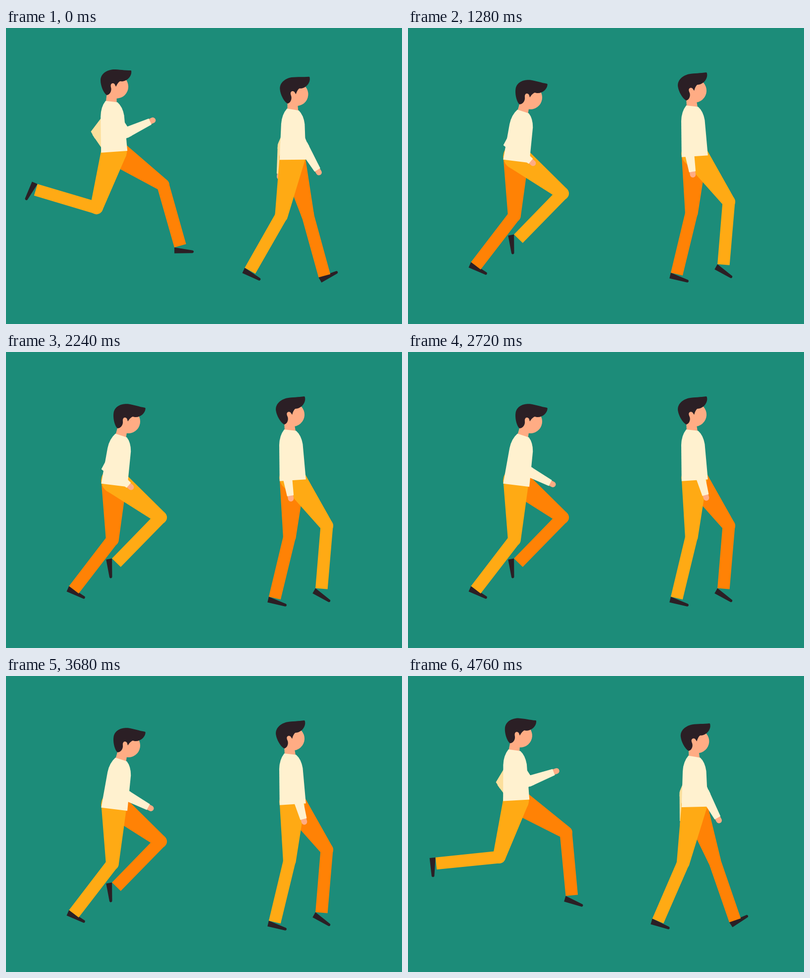
An HTML page with a canvas for the animation above (4.8 s loop, 800 by 600 pixels).

```html
<!DOCTYPE html>
<html lang="en">
<head>
<meta charset="utf-8">
<title>Run and walk</title>
<style>
html, body { margin: 0; width: 100%; height: 100%; overflow: hidden; background: #1c8c79; }
canvas { display: block; }
</style>
</head>
<body>
<canvas id="stage" width="800" height="600"></canvas>
<script>
const ctx = document.getElementById('stage').getContext('2d');
const STRIDE = 960, FRAME = 40;
const COLOR = {
  back: '#1c8c79', near: '#ffaa14', far: '#ff8205', shirt: '#fff1cf',
  sleeve: '#fcdf9c', skin: '#ffac84', dark: '#2b1f25'
};
const THIGH = 120, SHIN = 128, UPPER_ARM = 50;

const hair = new Path2D(`M-10.5-13C-18-19-22.5-34-22.5-42C-23-57-9-64 3-65
  C16-65 26-63 38.5-62.8Q40-62.5 39.7-60C40-52 33-43 23-41C20-40.5 18-41 16.5-41
  Q12-38 8.5-30L6-35C3-38.5-2-37-2-32C-2-29-1-28-1-25C-1-19-5-13-10.5-13Z`);
const neck = new Path2D('M-10-15L-12 3L10 5L10-9Z');
const torso = new Path2D('M-26.6 0L-22.5-73Q-21-92-10.3-104L13.5-99.5Q23-90 25-72L26.6 0Z');
const shoe = new Path2D('M0 0L0 12L36.5 11.8A2.8 2.8 0 0 0 37 6.3Z');

// A smooth cycle: the mean, then the cosine and sine weight of each harmonic.
const wave = (mean, ...weights) => phase => weights.reduce((sum, w, i) => {
  const angle = phase * (1 + (i >> 1));
  return sum + w * (i % 2 ? Math.sin(angle) : Math.cos(angle));
}, mean);

// The body moves once per step; limbs move once per stride of two steps.
const runner = {
  x: 218.7, hipX: 218.3, shoulder: -80, forearm: 55,
  hip: wave(254.7, -4.7, -3.5, 0, 0.5),
  hem: wave(258.7, -7.9, -5.5, 0, 3),
  lean: wave(3.3, -7.3),
  tilt: wave(1.6, -1.6, -7.6),
  thigh: wave(22.1, -37.1, 8.3, -3, -1.5, 0.8, -0.9),
  shin: wave(-47.6, -56.9, -34.9, 5, -9.6, -2.5, -4.8, -2.8, -0.5, -1.8),
  foot: wave(10.8, -4.5, 26),
  nearArm: [wave(-7.5, 33.5, -3.2, 7, -2.9), wave(57.5, 42.5, 17.6, 15, -7)],
  farArm: [wave(-6, -31, -20), wave(34, -32, -18.5, 28)]
};

const swing = [wave(0, 23), wave(12.3, 18.5, 6.9)];
const walker = {
  x: 579.3, hipX: 578.5, shoulder: -76, forearm: 59,
  hip: wave(258.3, 4.5, 1.8),
  hem: wave(263.8, 3.2, 2.5),
  lean: wave(-2.2, 1.5, 1),
  tilt: wave(-6.1, 0.5, 3.3),
  thigh: wave(10.8, -14.1, 12.4, -7.5, -1.4, 1.3, -0.8, -1.2),
  shin: wave(-15.4, -25.3, -12.8, 8.3, -12, 2.8, 2.9),
  foot: wave(3, -1, 7.3, -8.8, 1, 5.5, -3.5, -3.8, 4),
  nearArm: swing,
  farArm: swing.map(joint => phase => joint(phase + Math.PI))
};

const rad = deg => deg * Math.PI / 180;
// Angles run from straight down, positive towards the right.
const reach = (p, deg, len) => ({
  x: p.x + Math.sin(rad(deg)) * len,
  y: p.y + Math.cos(rad(deg)) * len
});

function disc(p, r) {
  ctx.beginPath();
  ctx.arc(p.x, p.y, r, 0, Math.PI * 2);
  ctx.fill();
}

function taper(a, b, deg, ra, rb) {
  const corners = [reach(a, deg + 90, ra), reach(b, deg + 90, rb),
                   reach(b, deg - 90, rb), reach(a, deg - 90, ra)];
  ctx.beginPath();
  corners.forEach(p => ctx.lineTo(p.x, p.y));
  ctx.fill();
}

function placed(p, deg, draw) {
  ctx.save();
  ctx.translate(p.x, p.y);
  ctx.rotate(rad(deg));
  draw();
  ctx.restore();
}

function drawLeg(rig, hip, phase, color) {
  const thigh = rig.thigh(phase), shin = rig.shin(phase);
  const knee = reach(hip, thigh, THIGH), ankle = reach(knee, shin, SHIN);
  const heel = reach(ankle, shin - 90, 12.3);
  ctx.fillStyle = COLOR.dark;
  placed(heel, rig.foot(phase) - shin, () => ctx.fill(shoe));
  ctx.fillStyle = color;
  disc(hip, 26);
  disc(knee, 13);
  taper(hip, knee, thigh, 26, 13);
  taper(knee, ankle, shin, 12.5, 12.3);
}

function drawArm(shoulder, joints, phase, length, color) {
  const [upper, fore] = joints.map(joint => joint(phase));
  const elbow = reach(shoulder, upper, UPPER_ARM), wrist = reach(elbow, fore, length);
  const bend = reach(elbow, fore, 9), palm = reach(wrist, fore, 6);
  ctx.strokeStyle = COLOR.skin;
  ctx.lineWidth = 11.5;
  ctx.lineCap = 'round';
  ctx.beginPath();
  ctx.moveTo(wrist.x, wrist.y);
  ctx.lineTo(palm.x, palm.y);
  ctx.stroke();
  ctx.strokeStyle = ctx.fillStyle = color;
  ctx.lineWidth = 21;
  ctx.lineCap = 'butt';
  ctx.lineJoin = 'miter';
  ctx.beginPath();
  ctx.moveTo(shoulder.x, shoulder.y);
  ctx.lineTo(elbow.x, elbow.y);
  ctx.lineTo(bend.x, bend.y);
  ctx.stroke();
  taper(elbow, wrist, fore, 11, 6.7);
}

function drawHead() {
  ctx.fillStyle = COLOR.skin;
  ctx.fill(neck);
  disc({ x: 9.5, y: -30 }, 24);
  ctx.fillStyle = COLOR.dark;
  ctx.fill(hair);
}

function drawFigure(rig, phase) {
  const step = phase * 2, lean = rig.lean(step);
  const hip = { x: rig.hipX, y: rig.hip(step) };
  const hem = { x: rig.x, y: rig.hem(step) };
  const onTorso = (side, up) => reach(reach(hem, 180 - lean, up), 90 - lean, side);
  const shoulder = onTorso(1, -rig.shoulder);
  drawArm(shoulder, rig.farArm, phase, rig.forearm, COLOR.sleeve);
  drawLeg(rig, hip, phase + Math.PI, COLOR.far);
  drawLeg(rig, hip, phase, COLOR.near);
  placed(onTorso(2, 102), rig.tilt(step), drawHead);
  ctx.fillStyle = COLOR.shirt;
  placed(hem, lean, () => ctx.fill(torso));
  drawArm(shoulder, rig.nearArm, phase, rig.forearm, COLOR.shirt);
}

function render(time) {
  const phase = time / STRIDE * Math.PI * 2;
  ctx.fillStyle = COLOR.back;
  ctx.fillRect(0, 0, 800, 600);
  drawFigure(runner, phase);
  drawFigure(walker, phase);
}

let start;
function tick(now) {
  start ??= now;
  render(Math.floor((now - start) / FRAME) * FRAME % STRIDE);
  requestAnimationFrame(tick);
}
render(0);
requestAnimationFrame(tick);
</script>
</body>
</html>
```
